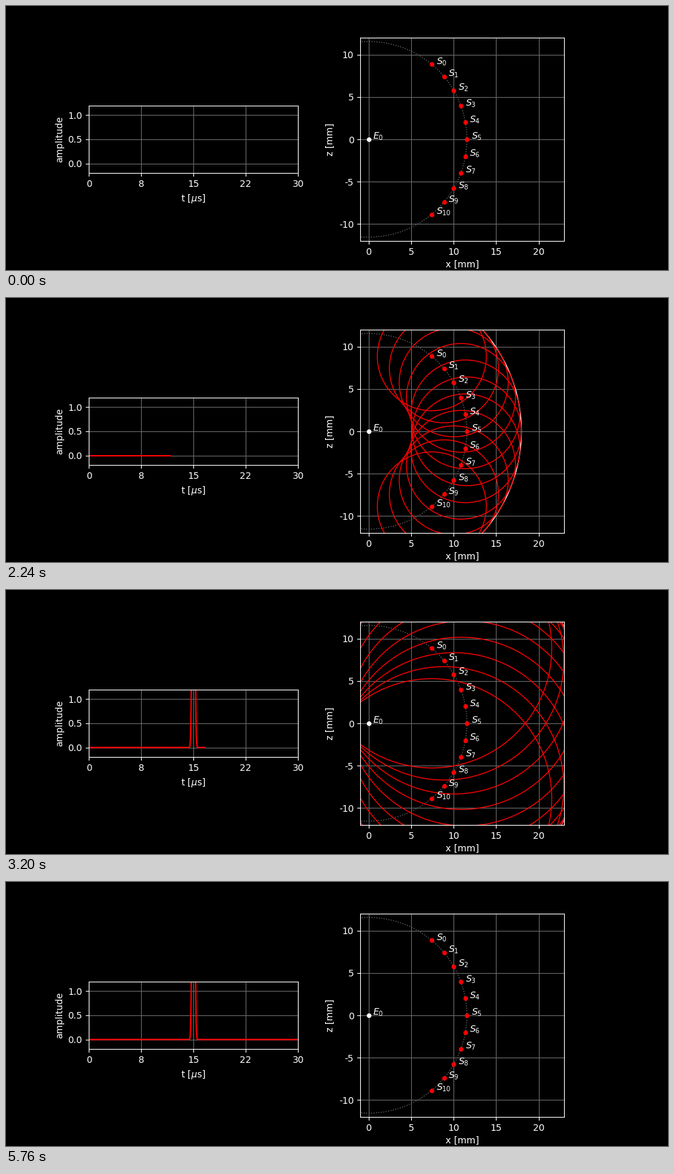
Animation, 1000 px wide and 400 px high, one loop 8 s. Source, as a matplotlib script:

```python
import numpy as np
import matplotlib.pyplot as plt
from matplotlib.animation import FuncAnimation
from matplotlib.patches import Circle

W, H = 1000, 400
FRAMES, INTERVAL = 200, 40
SWEEP = 144            # frames in which time runs, then the picture holds
T_END = 30.0           # microseconds
SPEED = 1.54           # mm per microsecond
T_HIT = 7.5            # wave reaches the scatterers
RADIUS = SPEED * T_HIT
SUB = 10               # curve samples per frame
GRID = "#696969"

plt.rcParams.update({
    "font.family": "DejaVu Sans",
    "font.size": 10,
    "text.color": "white",
    "axes.labelcolor": "white",
    "axes.edgecolor": "white",
    "axes.facecolor": "black",
    "xtick.color": "white",
    "ytick.color": "white",
    "grid.color": GRID,
})

fig = plt.figure(figsize=(W / 100, H / 100), dpi=100, facecolor="black")


def make_axes(left, bottom, width, height, xlim, ylim, xlabel, ylabel):
    ax = fig.add_axes([left / W, bottom / H, width / W, height / H])
    ax.set(xlim=xlim, ylim=ylim, xlabel=xlabel, ylabel=ylabel)
    ax.grid(True)
    return ax


def set_ticks(axis, values, fmt):
    axis.set_ticks(values, [fmt % v for v in values])


def mark(x, z, color, label):
    field.plot(x, z, "o", ms=4, color=color, zorder=3)
    field.text(x + 0.5, z, label, zorder=4)


def ring(x, z, color, radius=1.0, **style):
    return field.add_patch(Circle((x, z), radius, fill=False, ec=color,
                                  lw=1, **style))


# Received signal
signal = make_axes(125, 146.67, 316.33, 102.67, (0, T_END), (-0.2, 1.2),
                   r"t [$\mu$s]", "amplitude")
set_ticks(signal.xaxis, [0, 7.5, 15, 22.5, 30], "%.0f")
set_ticks(signal.yaxis, [0, 0.5, 1], "%.1f")

# Wave field
field = make_axes(535.12, 44, 308, 308, (-1, 23), (-12, 12),
                  "x [mm]", "z [mm]")
set_ticks(field.xaxis, range(0, 21, 5), "%d")
set_ticks(field.yaxis, range(-10, 11, 5), "%d")

angles = np.radians(np.arange(50, -51, -10))
points = [(RADIUS * np.cos(a), RADIUS * np.sin(a)) for a in angles]

ring(0, 0, GRID, RADIUS, ls=":", zorder=2)
mark(0, 0, "white", "$E_0$")
for n, (x, z) in enumerate(points):
    mark(x, z, "red", "$S_{%d}$" % n)

wave = ring(0, 0, "white", zorder=2.1)
echoes = [ring(x, z, "red", zorder=2.2) for x, z in points]

time = np.linspace(0, T_END, SWEEP * SUB + 1)
pulse = len(points) * np.exp(-0.5 * ((time - 2 * T_HIT) / 0.15) ** 2)
trace, = signal.plot([], [], color="red", lw=1.5)


def set_radius(circle, r):
    circle.set_visible(r > 0)
    circle.set_radius(max(r, 0))


def draw(i):
    step = min(i, SWEEP)
    t = T_END * step / SWEEP
    set_radius(wave, SPEED * t)
    for echo in echoes:
        set_radius(echo, SPEED * (t - T_HIT))
    end = step * SUB + 1
    trace.set_data(time[:end], pulse[:end])
    return [wave, trace, *echoes]


anim = FuncAnimation(fig, draw, frames=FRAMES, interval=INTERVAL,
                     init_func=lambda: draw(0), repeat=True, repeat_delay=0)
plt.show()
```
